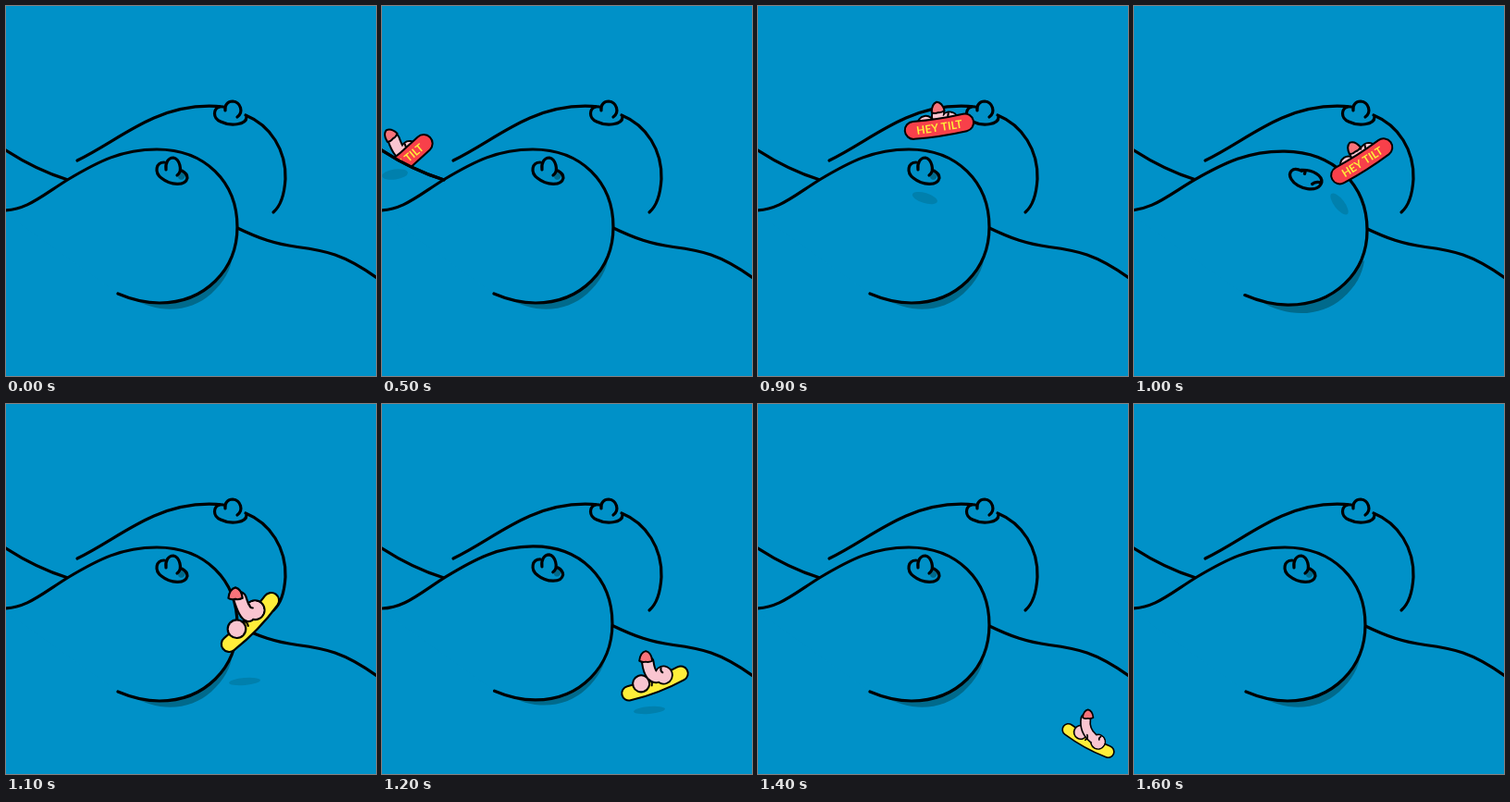
Animation of 400 by 400 pixels, one loop 1800 ms. Source, as an HTML page with a canvas:

```html
<!DOCTYPE html>
<html lang="en">
<head>
<meta charset="utf-8">
<title>Snowboard jump</title>
<style>
html, body { margin: 0; width: 100%; height: 100%; overflow: hidden; background: #0091c8; }
canvas { display: block; }
</style>
</head>
<body>
<canvas id="stage" width="400" height="400"></canvas>
<script>
const ctx = document.getElementById('stage').getContext('2d');
const SEA = '#0091c8', INK = '#000', SHADE = '#006a8c', SHADOW = '#0080ad',
      PINK = '#f9c5d0', TIP = '#f8737a', RED = '#f8404a', YELLOW = '#ffee3a';
const LOOP = 1800, STEP = 100;
const ENTER = 5, LAND = 10, DROP = 11, GONE = 16; // counted in steps

const slope = 'M0 156C20 169 45 181 67 188';
const hill = 'M-6 221C22 222 40 204 68 187C100 168 125 155 163 155C215 155 250 190 250 239C250 285 215 321 166 321C150 321 135 317 121 311';
const rad = deg => deg * Math.PI / 180;

function line(d, width = 3.2, color = INK) {
  ctx.lineWidth = width;
  ctx.strokeStyle = color;
  ctx.stroke(new Path2D(d));
}

function fill(d, color) {
  ctx.fillStyle = color;
  ctx.fill(new Path2D(d));
}

function ellipse(x, y, rx, ry, angle, color) {
  ctx.beginPath();
  ctx.ellipse(x, y, rx, ry, rad(angle), 0, 7);
  ctx.fillStyle = color;
  ctx.fill();
}

// Thick rounded stroke with a black rim
function tube(d, width, color) {
  line(d, width + 4, INK);
  line(d, width, color);
}

function ball(x, y, r) {
  ellipse(x, y, r + 1, r + 1, 0, INK);
  ellipse(x, y, r - 1, r - 1, 0, PINK);
}

function at(x, y, angle, draw) {
  ctx.save();
  ctx.translate(x, y);
  ctx.rotate(rad(angle));
  draw();
  ctx.restore();
}

// Damped spring: 1 is fully pressed, negative is stretched
function squash(step) {
  const t = step - LAND;
  return t < 0 || t > 4 ? 0 : Math.cos(t * Math.PI / 2) * (1 - t / 4);
}

function drawHill(press) {
  ctx.save();
  ctx.transform(1 + press / 40, press * .013, 0, 1, -press * 4.2, 0);
  at(press * 2, press * 2, 0, () => fill('M135 315C165 334 200 331 222 311C236 298 243 285 245 270Z', SHADE));
  fill(hill, SEA);
  line(hill);
  if (press > .9) {
    line('M181 176C171 171 166 178 170 185C176 196 199 200 202 188C203 181 193 174 180 175Q186 175 184 179M192 190Q195 187 200 188');
  } else {
    ellipse(190, 183, 4, 5, 25, SHADE);
    line('M171 169C162 169 160 180 168 186C178 194 194 195 196 186C196 182 194 180 190 178M173 177C172 170 175 164 181 164C187 165 192 178 185 183');
  }
  ctx.restore();
}

function drawScene(step) {
  ctx.fillStyle = SEA;
  ctx.fillRect(0, 0, 400, 400);
  line('M77 167C106 153 130 134 160 121C183 111 207 106 235 109M259 118C286 129 303 156 302 187C301 204 296 217 289 223');
  line('M231 109C224 111 223 121 232 125C242 130 260 129 260 120M237 113C236 107 240 103 245 103C254 104 257 115 250 120');
  line(slope);
  line('M248 239C275 252 290 257 315 260.5C345 264.5 365 268 401 294');
  drawHill(squash(step));
}

function drawBody(tipX, tipY, angle) {
  ball(-14, -5, 9);
  ball(12, -5, 9.5);
  tube(`M4 -6Q${tipX / 2 - 3} -9 ${tipX} ${tipY + 6}`, 10.5, PINK);
  ellipse(12, -5, 8.5, 8.5, 0, PINK);
  line('M12 -13Q10 -10 12 -8M-5 -6Q-1 -3 -4 1', 2);
  at(tipX, tipY, -angle, () => {
    const cap = 'M-7 4Q-6 -5 0 -6.5Q6 -5 7 4Q3 6 0 5Q-4 6 -7 4Z';
    fill(cap, TIP);
    line(cap, 2);
  });
}

// Hop over the hill, seen from below the board; t counts steps
function drawHop(t) {
  ellipse(14 + 41.6 * t, 182 + 6.4 * t, 14, 5.5, 60 * (t / 5) ** 4 - 8, SHADOW);
  ctx.save();
  if (t === 0) ctx.clip(new Path2D(slope + 'L400 188V0H0Z'));
  const x = 24 + 37 * t + 1.5 * t * t;
  const y = 167 + t * (1 - 12 * t + 2.37 * t * t);
  at(x, y, -40 + 33.2 * t - 6.34 * t * t, () => {
    drawBody(6 - 1.2 * t, -31 + 2.6 * t, 0);
    tube('M-28 -.5Q0 1.5 28 -.5', 17, RED);
    ctx.font = '700 12px Lato, sans-serif';
    ctx.textAlign = 'center';
    ctx.textBaseline = 'middle';
    ctx.fillStyle = YELLOW;
    ctx.fillText('HEY TILT', 0, 1);
  });
  ctx.restore();
  if (t === 0) line(slope);
}

// Fall to the ground, then slide out of view
function drawSlide(t) {
  const x = 264 + 31 * t;
  const ground = 271 + 31 * t;
  const angle = -46 + 25 * t;
  const scale = 1.09 - .09 * t;
  if (t < 2) ellipse(x - 6, ground + 29, 17, 4, -5, SHADOW);
  at(x, Math.min(236 + 66 * t, ground), angle, () => {
    ctx.scale(scale, scale);
    tube('M-30 0Q0 4 30 0', 13.5, YELLOW);
    drawBody(10 - 9 * t, -30, angle);
  });
}

function frame() {
  const step = Math.floor((performance.now() - start) % LOOP / STEP);
  ctx.lineCap = ctx.lineJoin = 'round';
  drawScene(step);
  if (step >= ENTER && step <= LAND) drawHop(step - ENTER);
  else if (step >= DROP && step < GONE) drawSlide(step - DROP);
  requestAnimationFrame(frame);
}

const start = performance.now();
frame();
</script>
</body>
</html>
```
